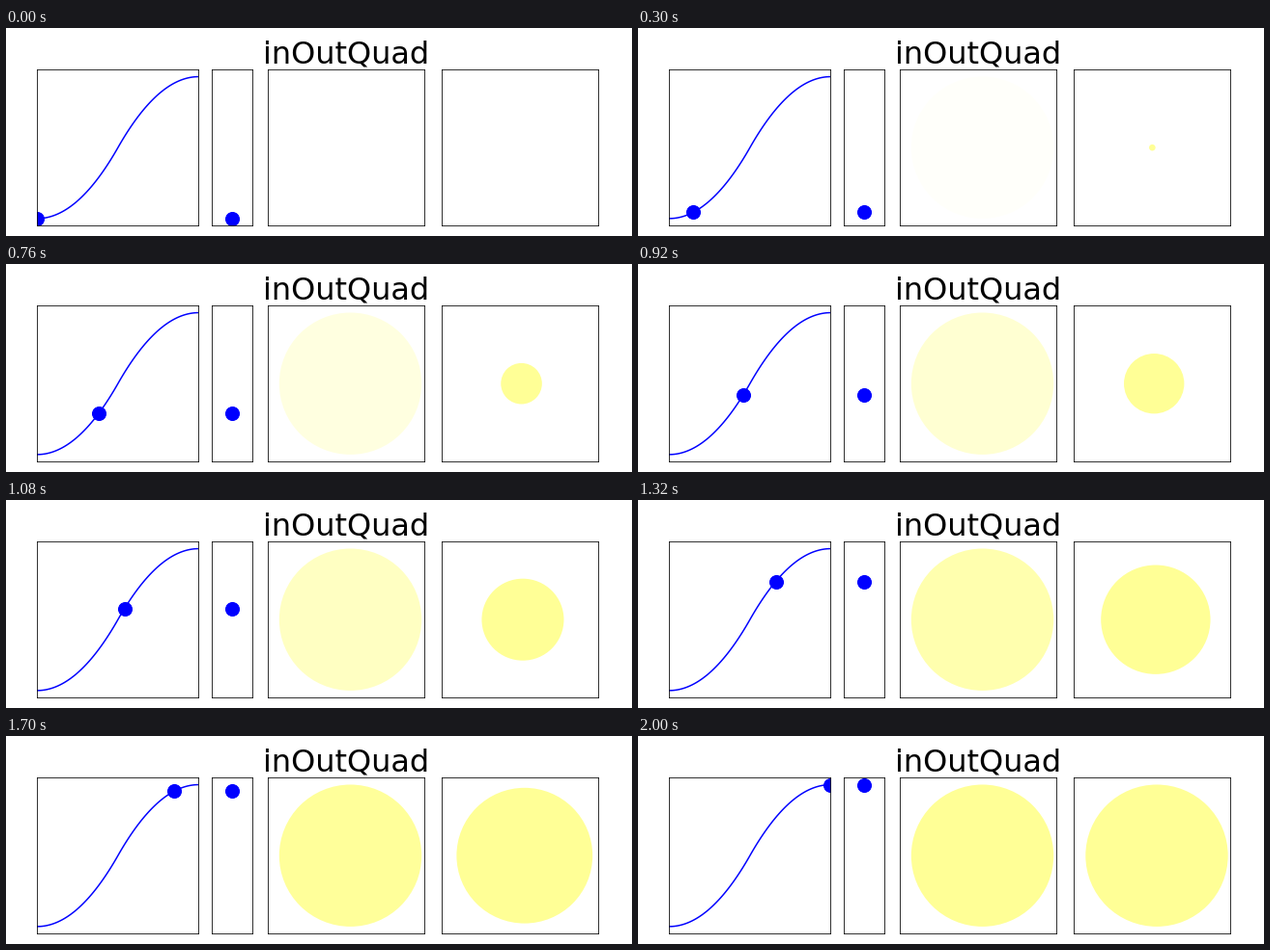
A matplotlib script that plays this animation: 648x216 px, repeating every 2.02 s.

```python
import numpy as np
import matplotlib.pyplot as plt
from matplotlib.animation import FuncAnimation
from matplotlib.patches import Circle

STEPS = 100
INTERVAL = 20
EMBLEM_CENTER = np.array([0.53, 0.5])
EMBLEM_RADIUS = 0.455
EMBLEM_COLOR = "#ffff96"


def in_out_quad(t):
    return np.where(t < 0.5, 2 * t**2, 1 - 2 * (1 - t) ** 2)


def add_emblem(ax):
    ax.set(xlim=(0, 1), ylim=(0, 1), aspect="equal")
    return ax.add_patch(
        Circle(EMBLEM_CENTER, EMBLEM_RADIUS, facecolor=EMBLEM_COLOR, linewidth=0)
    )


plt.rcParams["font.family"] = "DejaVu Sans"
fig, (ax_curve, ax_slide, ax_fade, ax_zoom) = plt.subplots(
    1, 4, figsize=(9, 3), dpi=72,
    gridspec_kw=dict(width_ratios=[4, 1, 4, 4], wspace=0.1,
                     left=0.05, right=0.95, bottom=0.05, top=0.8),
)
for ax in fig.axes:
    ax.set(xticks=[], yticks=[])
ax_fade.set_title("inOutQuad", fontsize=32)

t = np.linspace(0, 1, STEPS + 1)
ax_curve.plot(t, in_out_quad(t), color="blue", linewidth=1.5)
ax_curve.set(xlim=(0, 1), ylim=(-0.05, 1.05))
ax_slide.set(xlim=(-1, 1), ylim=(-0.05, 1.05))

dot_style = dict(marker="o", markersize=14, color="blue")
curve_dot, = ax_curve.plot([0], [0], **dot_style)
slide_dot, = ax_slide.plot([0], [0], **dot_style)
fading = add_emblem(ax_fade)
zooming = add_emblem(ax_zoom)


def update(step):
    x = step / STEPS
    y = float(in_out_quad(x))
    curve_dot.set_data([x], [y])
    slide_dot.set_data([0], [y])
    fading.set_alpha(y)
    zooming.set_center(0.5 + (EMBLEM_CENTER - 0.5) * y)
    zooming.set_radius(EMBLEM_RADIUS * y)
    return curve_dot, slide_dot, fading, zooming


anim = FuncAnimation(fig, update, frames=STEPS + 1, interval=INTERVAL,
                     repeat=True, repeat_delay=0)
plt.show()
```
